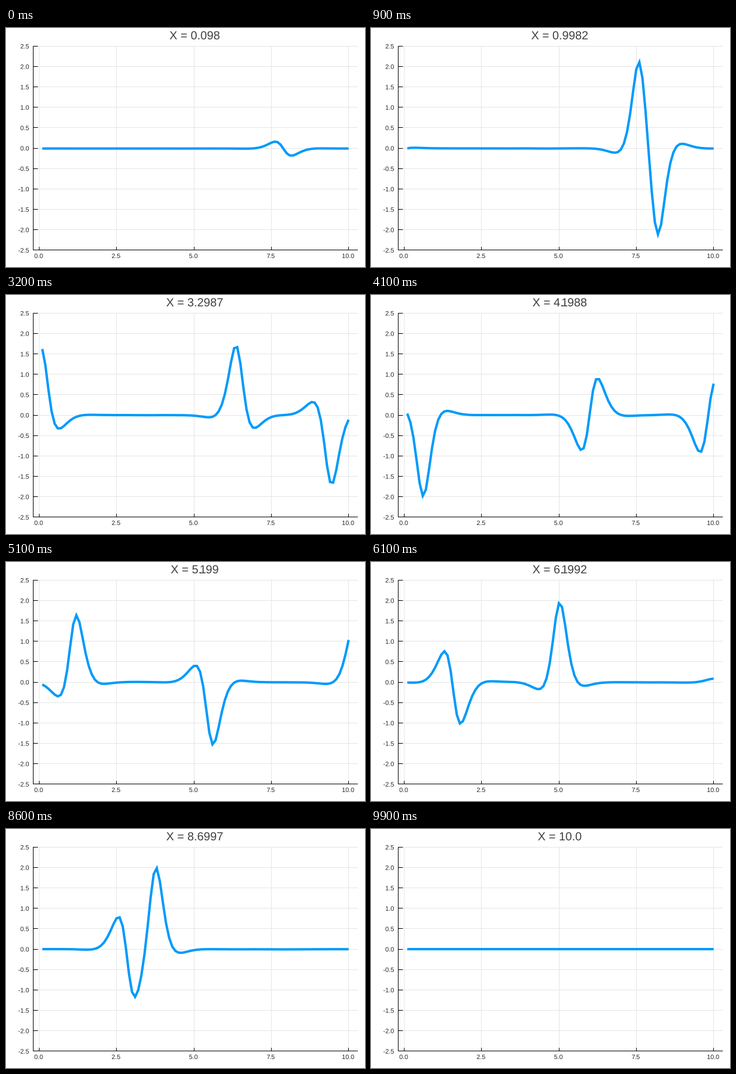
Write a matplotlib script that moves like this. It is 600x400 px and loops after 10 s.

```python
import matplotlib.pyplot as plt
import numpy as np
from matplotlib.animation import FuncAnimation
from matplotlib.patches import PathPatch
from matplotlib.path import Path
from matplotlib.textpath import TextPath
from matplotlib.transforms import Affine2D

W, H, DPI = 600, 400, 100
PX = 72 / DPI
FRAMES = 100
LENGTH = 10.0
LEFT, RIGHT, TOP, BOTTOM = 45.3, 588, 30.3, 371.8
T_MIN, T_MAX = -0.197, 10.297
Y_LIM = 2.5

TITLE_SIZE, TICK_SIZE = 19.6, 10.6
ADVANCE = {".": 0.278, " ": 0.278, "-": 0.333, "=": 0.584, "X": 0.667}
KERN = {"7.": -0.11, ".1": -0.17, "19": -0.04}


def soliton(x):
    return 2 / np.cosh(2 * (x - 3)) * np.exp(1j * (x - 3))


def wall_lift(x):
    """Linear profile that keeps the left wall at its starting value."""
    return soliton(0) * (1 - x / LENGTH)


def odd(f):
    return np.concatenate([[0], f[1:], [0], -f[:0:-1]])


def solve(positions, n=256, dt=0.001, steps=100):
    """Re u at the positions (rows) and at t = 0.1, 0.2, ... 10 (columns).

    Split-step solution of i u_t + u_xx + 2|u|^2 u = 0, both walls held fixed.
    """
    half = n // 2
    x = np.arange(half) * LENGTH / half
    lift = wall_lift(x)
    k = 2 * np.pi * np.fft.fftfreq(n, 2 * LENGTH / n)
    drift = np.exp(-0.5j * dt * k**2)
    c = np.fft.fft(odd(soliton(x) - lift))
    coefs = []
    for _ in range(FRAMES):
        for _ in range(steps):
            u = np.fft.ifft(c * drift)[:half] + lift
            u = u * np.exp(2j * dt * (u.real**2 + u.imag**2))
            c = np.fft.fft(odd(u - lift)) * drift
        coefs.append(c / n)
    u = np.exp(1j * np.outer(positions, k)) @ np.array(coefs).T
    return (u + wall_lift(positions)[:, None]).real


def to_px(t):
    return LEFT + (t - T_MIN) / (T_MAX - T_MIN) * (RIGHT - LEFT)


def to_py(v):
    return TOP + (Y_LIM - v) / (2 * Y_LIM) * (BOTTOM - TOP)


def text_path(s, x, base, size, align):
    """Outline of s on the given baseline; align 0 is left, 1 is right."""
    pen, glyphs = 0, []
    for prev, ch in zip(" " + s, s):
        pen += KERN.get(prev + ch, 0) * size
        if ch != " ":
            glyph = TextPath((0, 0), ch, size=size, prop={"family": "Liberation Sans"})
            glyphs.append(Affine2D().scale(1, -1).translate(pen, 0).transform_path(glyph))
        pen += ADVANCE.get(ch, 0.556) * size
    path = Path.make_compound_path(*glyphs)
    return Affine2D().translate(x - align * pen, base).transform_path(path)


def title_path(s):
    return text_path(s, 315.4, 19, TITLE_SIZE, 0.5)


def add_text(path, color):
    return ax.add_patch(PathPatch(path, fc=color, lw=0))


def center(p):
    return np.floor(p) + 0.5


def hline(y, x0, x1, color, z):
    ax.plot([x0, x1], [center(y)] * 2, color=color, lw=PX, zorder=z,
            solid_capstyle="butt", snap=False)


def vline(x, y0, y1, color, z):
    ax.plot([center(x)] * 2, [y0, y1], color=color, lw=PX, zorder=z,
            solid_capstyle="butt", snap=False)


fig = plt.figure(figsize=(W / DPI, H / DPI), dpi=DPI, facecolor="white")
ax = fig.add_axes([0, 0, 1, 1])
ax.set_xlim(0, W)
ax.set_ylim(H, 0)
ax.axis("off")

GRID, AXIS, TICK_TEXT = "#e5e5e5", "black", "#262626"

for t in np.arange(0, 10.1, 2.5):
    px = to_px(t)
    vline(px, TOP, BOTTOM, GRID, 1)
    vline(px, BOTTOM - 5.5, BOTTOM, AXIS, 3)
    add_text(text_path(f"{t:.1f}", px - 0.9, 385, TICK_SIZE, 0.5), TICK_TEXT)

for v in np.arange(-2.5, 2.6, 0.5):
    py = to_py(v)
    hline(py, LEFT, RIGHT, GRID, 1)
    hline(py, LEFT, LEFT + 8, AXIS, 3)
    add_text(text_path(f"{v:.1f}", 38.6, py + 4, TICK_SIZE, 1), TICK_TEXT)

vline(LEFT, TOP, BOTTOM, AXIS, 3)
hline(BOTTOM, LEFT, RIGHT, AXIS, 3)

# Every 50th point of a 5000-point grid over the box
positions = (50 * np.arange(1, FRAMES + 1) - 1) * LENGTH / 4999
waves = solve(positions)
times = np.arange(1, FRAMES + 1) / 10

curve, = ax.plot(to_px(times), to_py(waves[0]), color="#009afa", lw=4 * PX, zorder=4,
                 solid_joinstyle="miter", solid_capstyle="butt", snap=False)
title = add_text(title_path("X"), "#404040")


def draw(i):
    curve.set_ydata(to_py(waves[i]))
    title.set_path(title_path(f"X = {round(positions[i], 4)}"))
    return curve, title


anim = FuncAnimation(fig, draw, frames=FRAMES, interval=100, repeat=True)
plt.show()
```
